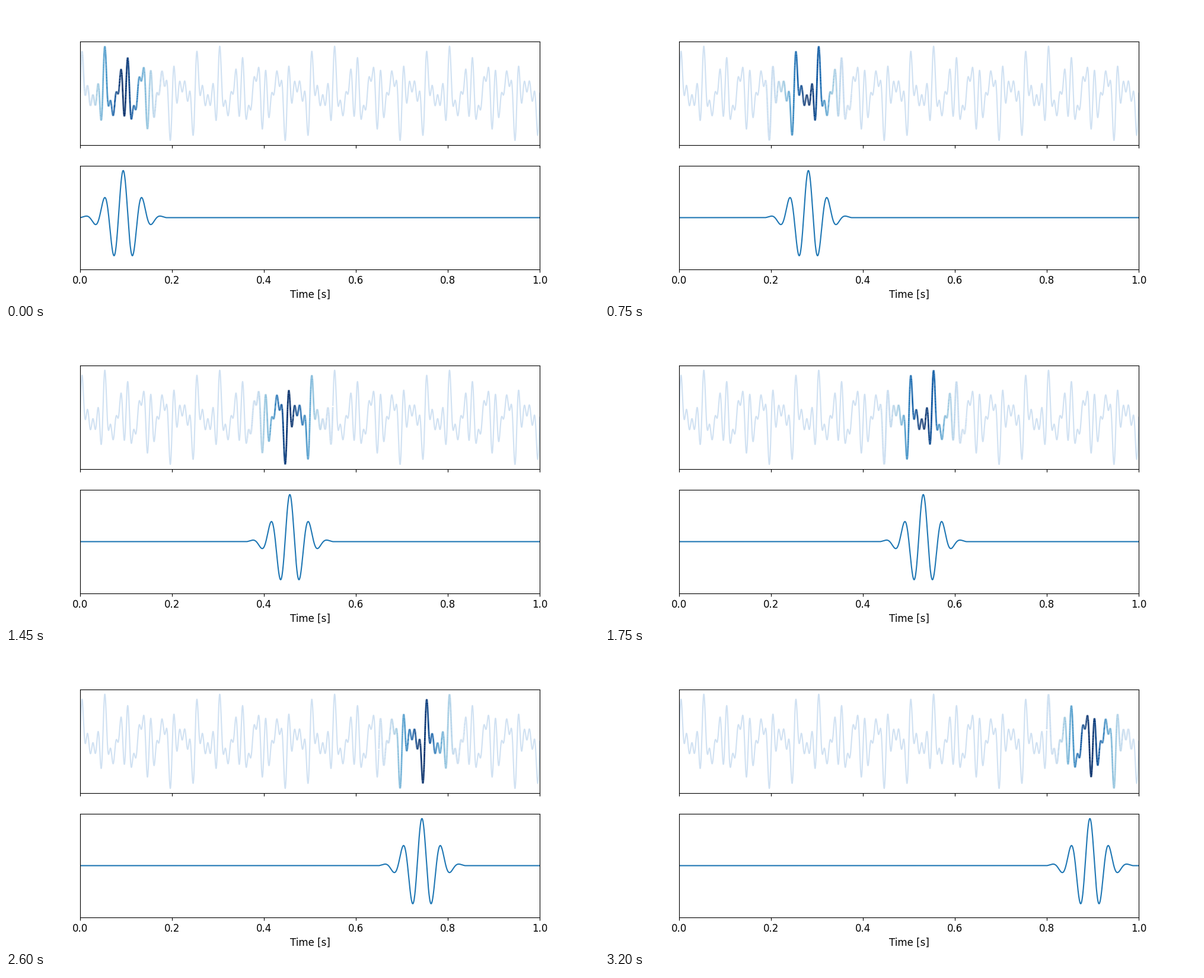
Recreate the animation shown at these times as a matplotlib script. Size 1000 px wide and 500 px high, loop 3.25 s.

```python
import numpy as np
import matplotlib.pyplot as plt
from matplotlib.animation import FuncAnimation
from matplotlib.collections import LineCollection

plt.rcParams["font.family"] = "DejaVu Sans"
plt.rcParams["font.size"] = 12

RATE = 8000             # samples per second
HOP = 100               # samples the wavelet moves per frame
FREQ = 24               # wavelet frequency in Hz
SIGMA = 0.75 / FREQ     # width of the Gaussian envelope
SIZE = int(6 * SIGMA * RATE)

t = np.arange(RATE + 1) / RATE
signal = sum(np.sin(2 * np.pi * f * t) for f in (24, 40, 60, 80))

tau = (np.arange(SIZE) - SIZE / 2) / RATE
envelope = np.exp(-tau**2 / (2 * SIGMA**2))
wavelet = envelope * np.cos(2 * np.pi * FREQ * tau)

starts = range(0, RATE - SIZE, HOP)
points = np.column_stack([t, signal])
segments = np.stack([points[:-1], points[1:]], axis=1)

fig, (top, bottom) = plt.subplots(2, 1, sharex=True, figsize=(10, 5), dpi=100)
top.set_xlim(0, 1)
top.set_ylim(-1.1 * signal.max(), 1.1 * signal.max())
bottom.set_ylim(-1.1, 1.1)
bottom.set_xlabel("Time [s]")
for ax in (top, bottom):
    ax.set_yticks([])

pale = plt.cm.Blues(0.2)
before, = top.plot([], [], color=pale, lw=1.5)
after, = top.plot([], [], color=pale, lw=1.5)
window = LineCollection([], colors=plt.cm.Blues(0.2 + 0.8 * envelope[:-1]), linewidths=2)
top.add_collection(window, autolim=False)
curve, = bottom.plot(t, np.zeros_like(t), color="C0", lw=1.5)


def draw(frame):
    i = starts[frame]
    j = i + SIZE
    before.set_data(t[:i], signal[:i])
    after.set_data(t[j:], signal[j:])
    window.set_segments(segments[i:j - 1])
    y = np.zeros_like(t)
    y[i:j] = wavelet
    curve.set_ydata(y)
    return before, after, window, curve


anim = FuncAnimation(fig, draw, frames=len(starts), interval=50,
                     repeat=True, repeat_delay=0, blit=False)
plt.show()
```
